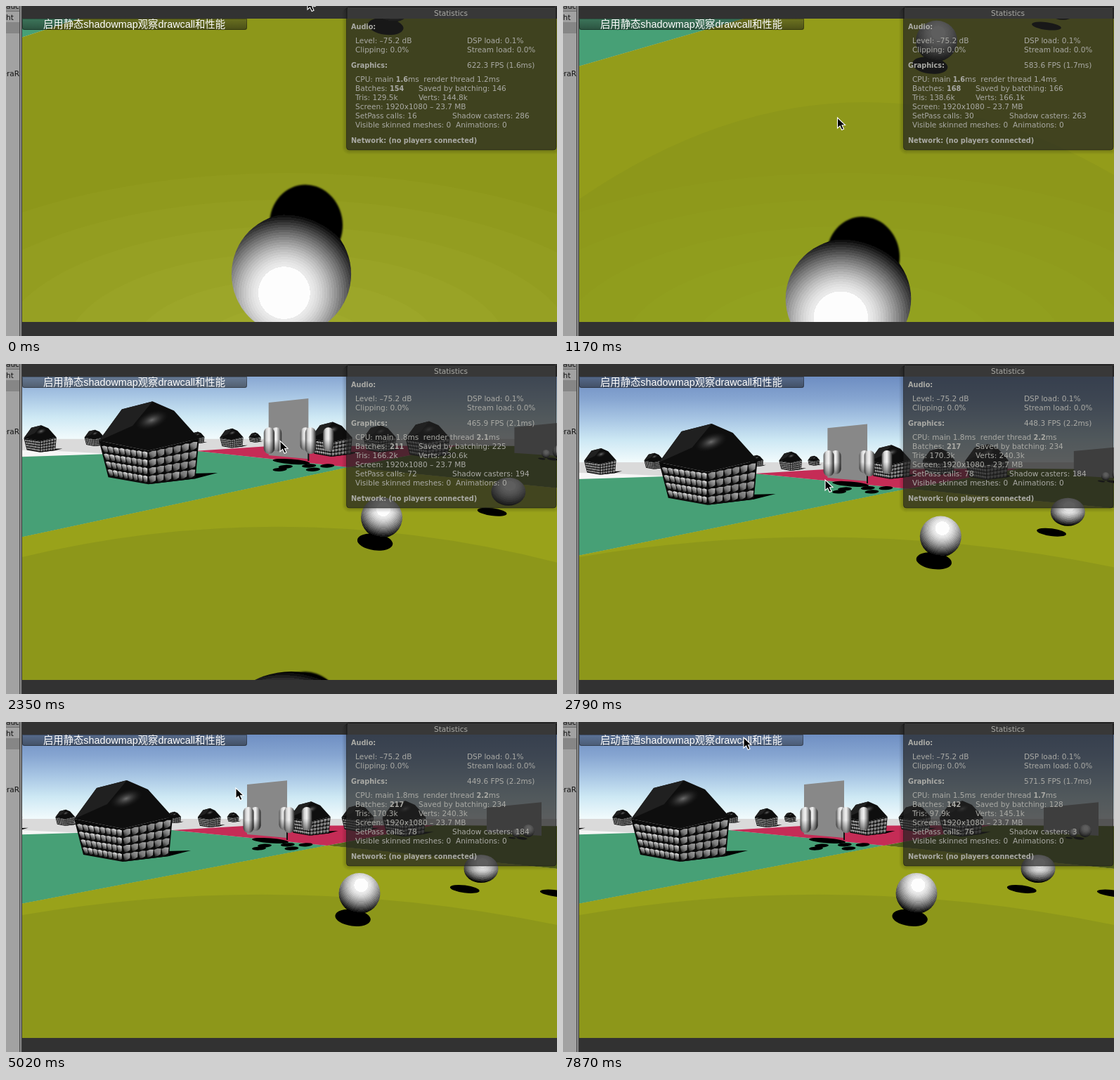
Write an HTML page with a canvas that moves like this. It is 784x470 px and loops after 8 s.

```html
<!DOCTYPE html>
<html lang="zh">
<head>
<meta charset="utf-8">
<style>
html, body { margin: 0; width: 100%; height: 100%; overflow: hidden; background: #323232; }
canvas { display: block; }
</style>
</head>
<body>
<canvas id="stage" width="784" height="470"></canvas>
<script>
const g = document.getElementById('stage').getContext('2d');
const LOOP = 8000, STEP = 145.5, HOVER = 5470, PRESS = 6820, SWAP = 6970;
const HORIZON = 136, HOUSE_WIDTH = 141;

// Key points: step, then the values to move between
const CAMERA = [[0, -310, 45], [6, -384, 30], [10, -98, 25], [19, 2, 33], [23, 0, 0]];
const POINTER = [[0, 429, -10], [6, 357, 319], [10, 424, -1], [19, 373, 165],
  [23, 397, 166], [29, 397, 166], [39, 257, 22]];

const STATS = {
  down: { fps: 622.3, main: 1.6, render: 1.2, batches: 154, saved: 146, tris: 129.5, verts: 144.8, passes: 16, casters: 286 },
  raised: { fps: 448.3, main: 1.8, render: 2.2, batches: 217, saved: 234, tris: 170.3, verts: 240.3, passes: 78, casters: 184 },
  baked: { fps: 571.5, main: 1.5, render: 1.7, batches: 142, saved: 128, tris: 97.9, verts: 145.1, passes: 76, casters: 3 }
};

let tilt = 0, pan = 0, stretch = 0;

const lerp = (a, b, k) => a + (b - a) * k;
const clamp01 = v => Math.min(1, Math.max(0, v));

function along(path, step) {
  const next = path.findIndex(p => p[0] > step);
  if (next < 0) return path[path.length - 1].slice(1);
  const a = path[next - 1], b = path[next];
  const k = (step - a[0]) / (b[0] - a[0]);
  return [lerp(a[1], b[1], k), lerp(a[2], b[2], k)];
}

// Places a point of the resting view under the current camera
function view(x, y) {
  return [
    x + pan * (1 + ((x - 400) / 520) ** 2),
    y + tilt + stretch * (y - HORIZON)
  ];
}

function noise(seed) {
  const v = Math.sin(seed * 127.1) * 43758.5;
  return v - Math.floor(v);
}

function poly(fill, ...pts) {
  g.fillStyle = fill;
  g.beginPath();
  pts.forEach(p => g.lineTo(p[0], p[1]));
  g.fill();
}

const ground = (fill, ...pts) => poly(fill, ...pts.map(p => view(...p)));

function oval(fill, x, y, rx, ry, turn = 0) {
  g.fillStyle = fill;
  g.beginPath();
  g.ellipse(x, y, rx, ry, turn, 0, 7);
  g.fill();
}

function rounded(fill, x, y, w, h, r) {
  g.fillStyle = fill;
  g.beginPath();
  g.roundRect(x, y, w, h, r);
  g.fill();
}

function gradient(x0, y0, x1, y1, ...colors) {
  const grad = g.createLinearGradient(x0, y0, x1, y1);
  colors.forEach((c, i) => grad.addColorStop(i / (colors.length - 1), c));
  return grad;
}

function placed(x, y, size, draw) {
  const scale = size * (1 + .3 * stretch);
  g.save();
  g.translate(...view(x, y));
  g.scale(scale, scale);
  draw();
  g.restore();
}

// Ball shaded in flat rings around its highlight
function ball(x, y, rx, ry, hx, hy, core, bands) {
  g.save();
  g.translate(x, y);
  g.scale(rx, ry);
  const grad = g.createRadialGradient(hx, hy, 0, hx, hy, 1 + Math.hypot(hx, hy));
  grad.addColorStop(0, '#fdfdfd');
  grad.addColorStop(core, '#fdfdfd');
  for (let i = 0; i < bands; i++) {
    const v = Math.round(234 * (1 - (i / (bands - 1)) ** 1.35));
    const tone = `rgb(${v},${v},${v})`;
    grad.addColorStop(lerp(core, 1, i / bands), tone);
    grad.addColorStop(lerp(core, 1, (i + 1) / bands), tone);
  }
  oval(grad, 0, 0, 1, 1);
  g.restore();
}

// Rows of bulging tiles, each lit from its upper corner
function wall(tl, tr, bl, br, cols, lit) {
  const at = (u, v) => [0, 1].map(i => lerp(lerp(tl[i], tr[i], u), lerp(bl[i], br[i], u), v));
  const rows = 4;
  for (let r = 0; r < rows; r++) {
    for (let c = 0; c < cols; c++) {
      const cell = (u, v) => at((c + u) / cols, (r + v) / rows);
      const v = Math.round(lit * (.75 + .25 * noise(r * 9 + c + cols)));
      const fill = gradient(...cell(.9, .1), ...cell(.1, .95), `rgb(${v},${v},${v})`, '#777', '#080808');
      poly(fill, cell(.05, .16), cell(.5, .04), cell(.98, .12), cell(.95, .75), cell(.6, .9), cell(.25, .95));
    }
  }
}

// Origin at the front bottom corner
function house() {
  const apex = [6, -116], left = [-69, -61], right = [71, -64], front = [0, -47];
  poly('#000', [62, -15], [97, -16], [66, -8], [0, 0]);
  poly('#0a0a0a', left, front, right, [66, -8], [0, 0], [-56, -10]);
  wall([0, -46], [69, -61], [0, -1], [65, -9], 6, 190);
  wall([-66, -55], [-1, -46], [-55, -11], [-1, -1], 8, 255);
  poly('#0e0e0e', left, [-37, -105], apex, [36, -103], right, front);
  poly('#202020', left, [-37, -105], apex, [-22, -82]);
  g.save();
  g.translate(5, -90);
  g.rotate(-.35);
  g.scale(1, .5);
  const shine = g.createRadialGradient(0, 0, 0, 0, 0, 24);
  shine.addColorStop(0, '#6c6c6c');
  shine.addColorStop(1, 'rgba(30,30,30,0)');
  oval(shine, 0, 0, 24, 24);
  g.restore();
}

// All houses are one size, so the width on screen tells how far below the horizon they stand
const houseAt = (x, width) =>
  placed(x, HORIZON - 1 + width / 2.2, width / HOUSE_WIDTH, house);

function capsule(x, base, w, h) {
  const side = gradient(x - w / 2, 0, x + w / 2, 0, '#555', '#d4d4d4', '#f4f4f4', '#999', '#262626');
  rounded(side, x - w / 2, base - h, w, h, w / 2);
  rounded(gradient(0, base - h, 0, base, 'transparent', 'transparent', 'rgba(0,0,0,.5)'),
    x - w / 2, base - h, w, h, w / 2);
}

function statues() {
  const row = [[-45, -3], [-55, 0], [-4, -4], [3, 0], [28, -4]];
  oval('#000', -24, 11, 26, 3.5, .08);
  row.forEach(([x, base]) => oval('#000', x * .8 + 4, 22 + base * 1.3, 10, 2.6, -.05));
  poly('#111', [-1, -8], [1, -8], [1, 10], [-1, 10]);
  row.forEach(([x, base]) => capsule(x, base, 15, 37 + base));
}

function board(x, y, w, h) {
  ground('#888', [x, y], [x + w, y - .1 * w], [x + w, y + h], [x, y + h - 5]);
}

function shadedBall(x, y, rx, ry, shadow) {
  const [bx, by] = view(x, y);
  oval('#000', bx - rx * shadow.shift, by + rx * 1.18, rx * .86, rx * shadow.flat, .13);
  ball(bx, by, rx, ry, .08, -.4, .24, 14);
}

function land(step) {
  const sky = HORIZON + tilt;
  poly(gradient(0, sky - 118, 0, sky, '#6f8fc3', '#86a5d1', '#a8c6e4', '#cde8f4', '#f0fafc'),
    [23, 18], [784, 18], [784, 450], [23, 450]);

  // Four coloured fields meet at one corner
  const corner = [457, 176], west = [-177, 297], north = [640, 141], tip = [237, 154], east = [884, 219];
  ground('#dadada', [-200, 138], [1000, 138], [1000, 500], [-200, 500]);
  ground('#f6f6f6', [-200, 150], [23, 154], [130, 159], [-200, 164]);
  ground('#47a076', [-200, 167], tip, corner, west);
  ground('#c52c56', tip, [340, 148], [610, 147], corner);
  ground('#58681c', corner, [610, 147], [1000, 150], east);
  const edge = [view(...west), view(...corner), view(...east), [884, 450], [-100, 450]];
  poly('#8d971a', ...edge);

  g.save();
  g.beginPath();
  edge.forEach(p => g.lineTo(...p));
  g.clip();
  const raised = clamp01((step - 6) / 4);
  const left = 275, right = 289 + .2 * tilt, peak = 246 + .45 * tilt;
  g.globalAlpha = raised;
  g.fillStyle = '#99a21a';
  g.beginPath();
  g.moveTo(23, 0);
  g.lineTo(23, left);
  g.quadraticCurveTo(400, 2 * peak - (left + right) / 2, 784, right);
  g.lineTo(784, 0);
  g.fill();
  g.globalAlpha = 1 - raised;
  for (let i = 0; i < 6; i++)
    oval('rgba(210,214,110,.04)', 400, 490, 600 - i * 95, 252 - i * 38);
  g.restore();
}

// The near ball rides with the camera
function player() {
  const y = 540 + .51 * tilt;
  g.filter = 'blur(1px)';
  oval('#000', 427, y - 24 + .15 * tilt, 52, 57, -.1);
  g.filter = 'none';
  ball(406, y, 104 + .061 * tilt, 86, -.12, .31, .325, 22);
}

function scene(step) {
  land(step);
  [[0, 46], [84, 28], [239, 20], [289, 33], [323, 17], [500, 46], [566, 62], [432, 59]]
    .forEach(h => houseAt(...h));
  board(343, 89, 57, 76);
  board(684, 122, 78, 40);
  placed(400, 158, 1, statues);
  houseAt(166, HOUSE_WIDTH);
  shadedBall(743, 155, 9, 9, { shift: 1, flat: .2 });
  shadedBall(726, 158, 6, 6, { shift: 1, flat: .2 });
  shadedBall(503, 244, 29.5, 29, { shift: .32, flat: .4 });
  shadedBall(676, 209, 24.5, 20, { shift: .95, flat: .22 });
  shadedBall(814, 209, 30, 24, { shift: .95, flat: .16 });
  player();
}

function label(str, x, y, font, color, align = 'left') {
  g.font = font;
  g.fillStyle = color;
  g.textAlign = align;
  g.fillText(str, x, y);
  return x + g.measureText(str).width;
}

function button(t) {
  const pressed = t >= PRESS && t < SWAP;
  const dark = pressed ? .65 : t >= HOVER ? .4 : .48;
  const width = t >= HOVER ? 319 : 320;
  const corners = [0, 0, 3, 3];
  rounded(gradient(0, 18, 0, 34, `rgba(40,40,40,${dark - .12})`, `rgba(20,20,20,${dark + .08})`),
    23, 18, width, 16, corners);
  g.strokeStyle = 'rgba(0,0,0,.3)';
  g.lineWidth = 1;
  g.beginPath();
  g.roundRect(23.5, 18.5, width - 1, 15, corners);
  g.stroke();
  label((t < SWAP ? '启用静态' : '启动普通') + 'shadowmap观察drawcall和性能', 53, 31,
    '14.35px "Liberation Sans", "Noto Sans CJK SC", "Noto Sans CJK", sans-serif', '#fff');
}

function counters(t) {
  if (t >= SWAP) return STATS.baked;
  const { down, raised } = STATS, k = clamp01(1 + tilt / 310), now = {};
  for (const name in down) now[name] = lerp(down[name], raised[name], k);
  if (t >= 4120) now.fps += 1.3;
  return now;
}

function statistics(t) {
  g.lineWidth = 1;
  for (let i = 1; i <= 6; i++) {
    g.strokeStyle = `rgba(0,0,0,${.2 - i * .03})`;
    g.beginPath();
    g.roundRect(484.5 - i, 2, 299 + 2 * i, 203 + i, 4 + i);
    g.stroke();
  }
  rounded('rgba(34,34,34,.72)', 484.5, 1.5, 298.5, 203.5, 4);
  g.strokeStyle = 'rgba(20,20,20,.6)';
  g.stroke();
  g.fillStyle = '#383838';
  g.fillRect(486, 2, 296, 16);

  const n = counters(t);
  const one = v => v.toFixed(1), int = Math.round;
  const plain = '10.5px "DejaVu Sans", sans-serif', bold = 'bold 9.7px "DejaVu Sans", sans-serif';
  const ink = '#aaaaa5';
  const text = (s, x, y) => label(s, x, y, plain, ink);
  const strong = (s, x, y) => label(s, x, y, bold, ink);

  label('Statistics', 633, 14, plain, ink, 'center');
  strong('Audio:', 491, 33);
  text('Level: –75.2 dB', 497, 53);
  text('DSP load: 0.1%', 656, 53);
  text('Clipping: 0.0%', 497, 66);
  text('Stream load: 0.0%', 656, 66);
  strong('Graphics:', 491, 88);
  text(`${one(n.fps)} FPS (${one(1000 / n.fps)}ms)`, 656, 88);
  const mainBound = n.main >= n.render;
  let x = text('CPU: main ', 497, 108);
  x = (mainBound ? strong : text)(one(n.main), x, 108);
  x = text('ms  render thread ', x, 108);
  x = (mainBound ? text : strong)(one(n.render), x, 108);
  text('ms', x, 108);
  strong(int(n.batches), text('Batches: ', 497, 121), 121);
  text('Saved by batching: ' + int(n.saved), 587, 121);
  text(`Tris: ${one(n.tris)}k`, 497, 134);
  text(`Verts: ${one(n.verts)}k`, 587, 134);
  text('Screen: 1920x1080 – 23.7 MB', 497, 147);
  text('SetPass calls: ' + int(n.passes), 497, 160);
  text('Shadow casters: ' + int(n.casters), 635, 160);
  text('Visible skinned meshes: 0', 497, 173);
  text('Animations: 0', 640, 173);
  strong('Network: (no players connected)', 491, 195);
}

function sidebar() {
  const rect = (c, ...box) => { g.fillStyle = c; g.fillRect(...box); };
  rect('#a2a2a2', 0, 0, 20, 470);
  rect('#8f8f8f', 0, 0, 20, 7);
  rect('#6f6f6f', 0, 7, 20, 1);
  rect('#868686', 0, 23, 19, 16);
  rect('#4a4a4a', 19, 0, 1, 470);
  rect('#8a8a8a', 20, 0, 2, 470);
  rect('#3c3c3c', 22, 0, 1, 470);
  g.save();
  g.beginPath();
  g.rect(0, 0, 19, 470);
  g.clip();
  const font = '10.5px "DejaVu Sans", sans-serif';
  label('auc', 0, 4, font, '#111');
  label('ht', 0, 20, font, '#111');
  label('eraR', 19, 100, font, '#111', 'right');
  g.restore();
}

function pointer(step) {
  g.save();
  g.translate(...along(POINTER, step));
  poly('#000', [0, 0], [0, 15], [3.6, 11.8], [6.2, 17.5], [9, 16.3], [6.5, 10.8], [11, 10.6]);
  g.closePath();
  g.strokeStyle = '#fff';
  g.lineWidth = 1.1;
  g.stroke();
  g.restore();
}

function draw(t) {
  const step = Math.floor(t / STEP);
  [tilt, pan] = along(CAMERA, step);
  stretch = -.0018 * tilt;
  g.fillStyle = '#323232';
  g.fillRect(0, 0, 784, 470);
  g.save();
  g.beginPath();
  g.rect(23, 18, 761, 432);
  g.clip();
  scene(step);
  button(t);
  g.restore();
  sidebar();
  statistics(t);
  pointer(step);
}

const start = performance.now();
(function tick() {
  draw((performance.now() - start) % LOOP);
  requestAnimationFrame(tick);
})();
</script>
</body>
</html>
```
